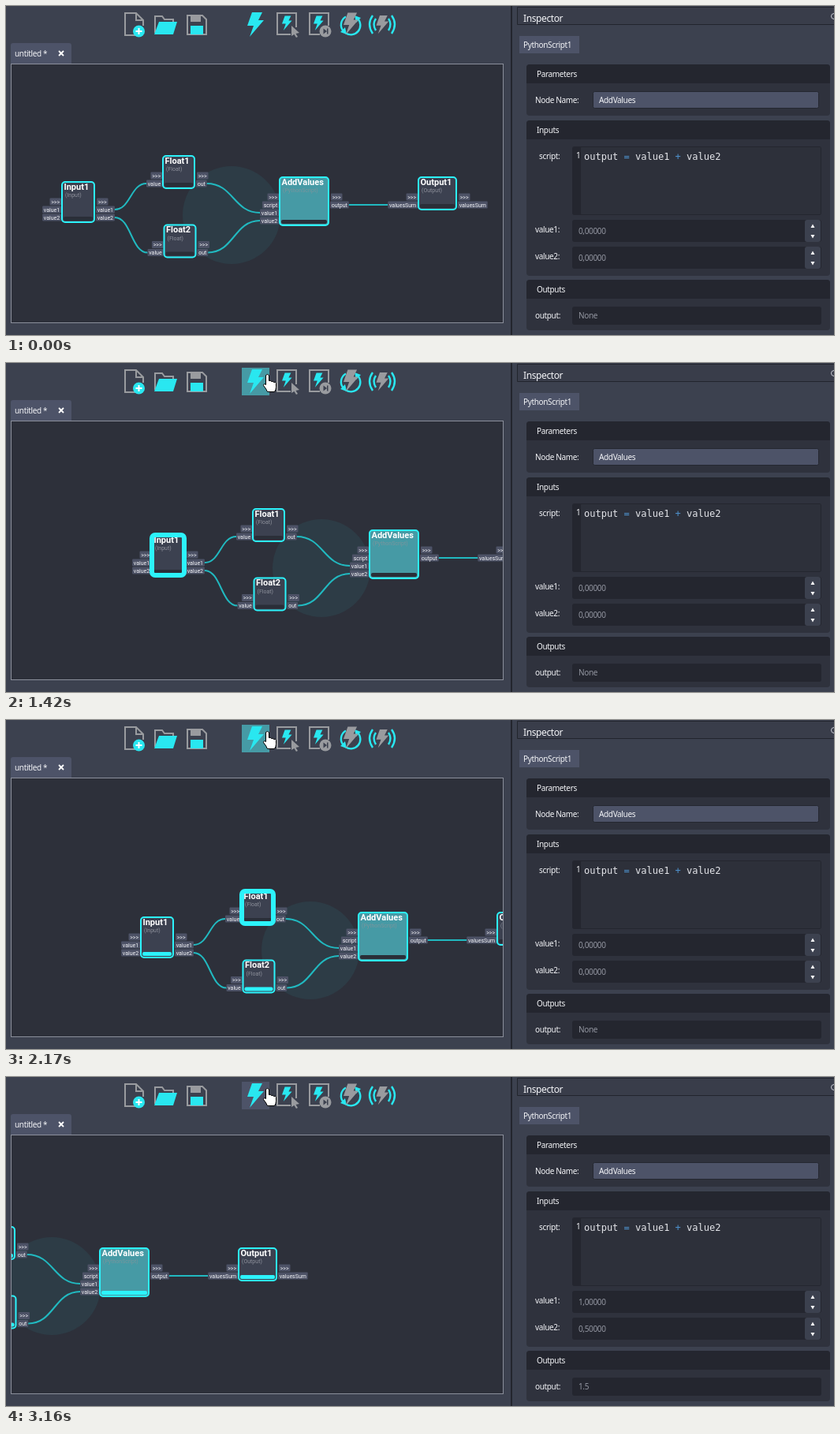
These frames come from a looping animation (1050x417 px, 3.86 s). An HTML page:

```html
<!DOCTYPE html>
<html lang="en">
<head>
<meta charset="utf-8">
<title>Node editor</title>
<style>
html, body { margin: 0; width: 100%; height: 100%; overflow: hidden; background: #3c414f; }
svg { display: block; }
text { font: 10px "Noto Sans", sans-serif; letter-spacing: -.35px; fill: #f4f5f8; white-space: pre; }
.head { font-size: 12px; letter-spacing: -.4px; }
.value { fill: #9396a1; }
.code { font: 12px "DejaVu Sans Mono", monospace; letter-spacing: 0; fill: #e4e5ea; }
.code tspan { fill: #4f93cf; }
.node text, .port { font: 7px Roboto, sans-serif; letter-spacing: 0; }
.node .title { font: 700 11px Roboto, sans-serif; fill: #fff; }
.node .type { fill: #8d909b; }
.body { fill: #3c4150; }
.selected .body { fill: #469aa5; }
.selected .type { fill: #7a959d; }
.bar { fill: #2a2e38; }
.done .bar { fill: #2cf3fb; }
.frame { fill: none; stroke: #2cf3fb; stroke-width: 2; }
.active .frame { stroke-width: 6; }
.link { fill: none; stroke: #21b9c0; stroke-width: 2; }
.cyan { fill: #29e7f0; }
.gray { fill: #999b9f; }
.line { fill: none; stroke: #999b9f; stroke-width: 2; }
.arc { fill: none; stroke: #29e7f0; stroke-width: 2.4; }
</style>
</head>
<body>
<svg id="stage" width="1050" height="417">
  <defs>
    <clipPath id="view"><rect x="7" y="74" width="623" height="327"/></clipPath>
    <path id="bolt" d="M-4-16H9L4-6H11L-7 15L-2 1H-10Z"/>
  </defs>
  <rect width="1050" height="417" fill="#3c414f"/>

  <g id="toolbar">
    <rect id="button" x="299" y="6" width="35" height="35"/>
    <path class="line" d="M164 37H151V9H165L174 18V25M165 9V18H174"/>
    <circle class="cyan" cx="168.500" cy="32" r="7.500"/>
    <path d="M168.500 28V36M164.500 32H172.500" stroke="#fff" stroke-width="2"/>
    <path class="line" d="M189 34V13H198L201 17H212V21"/>
    <path class="cyan" d="M194 20H217L212 36H188Z"/>
    <path class="line" d="M230 12H249L254 17V36H230Z"/>
    <path class="gray" d="M234 12H247V20H234Z"/>
    <path class="cyan" d="M234 25H250V36H234Z"/>
    <use href="#bolt" class="cyan" x="316" y="24"/>
    <path class="line" d="M361 36H344V9H368V27"/>
    <use href="#bolt" class="cyan" transform="translate(356 22) scale(.6)"/>
    <path class="gray" d="M362 25L372 34L367.500 35L370 39L368 40L365.500 36L362 38Z"/>
    <path class="line" d="M398 36H385V9H409V25"/>
    <use href="#bolt" class="cyan" transform="translate(396 22) scale(.6)"/>
    <circle class="gray" cx="405" cy="32" r="7.500"/>
    <path d="M402.500 28.500L407 32L402.500 35.500ZM407 28.500H408.500V35.500H407Z" fill="#3c414f"/>
    <path class="arc" d="M428 32A12 12 0 0 1 431 13.500M446 16A12 12 0 0 1 431 34.500"/>
    <path class="cyan" d="M442 12L450 15L444 21ZM432 36L424 33L430 27Z"/>
    <use href="#bolt" class="gray" transform="translate(437 23) scale(.9)"/>
    <use href="#bolt" class="gray" transform="translate(477 24) scale(.75)"/>
    <path class="arc" d="M469 16Q464 23 469 31M465 12Q457 23 465 35M485 16Q490 23 485 31M489 12Q497 23 489 35"/>
  </g>

  <path d="M6 73V50Q6 47 9 47H80Q83 47 83 50V73Z" fill="#4d5368"/>
  <text x="11" y="64">untitled *</text>
  <path d="M67 57L73 63M73 57L67 63" stroke="#fff" stroke-width="1.800"/>
  <rect x="6.500" y="73.500" width="624" height="328" fill="#2d303a" stroke="#8b8f9b"/>
  <g clip-path="url(#view)"><g id="graph"><circle cx="286" cy="265" r="62" fill="#2d3c46"/></g></g>

  <path d="M641 0V417" stroke="#23262e" stroke-width="2"/>
  <path d="M1050 1.500H648.500V23.500H1050" fill="#393d4a" stroke="#22252d"/>
  <text class="head" x="656" y="20">Inspector</text>
  <circle cx="1050" cy="13" r="3.500" fill="none" stroke="#c9ccd4"/>
  <rect x="651" y="38" width="76" height="22" fill="#4d5368"/>
  <text x="656" y="53">PythonScript1</text>
  <g id="panel"></g>
  <g id="cursor" stroke="#000" fill="#fff">
    <path id="arrow" d="M0 0V16L4 12.500L6.500 18L9 17L6.500 11.500H12Z"/>
    <path id="hand" d="M-1 1Q1-1 3 1V8Q5 7 6 9Q8 8 9 10Q11 9 12 11V16Q12 19 10 22H1Q0 19-4 14Q-4 11-1 13Z"/>
  </g>
</svg>
<script>
const $ = id => document.getElementById(id);
const add = (parent, markup) => parent.insertAdjacentHTML('beforeend', markup);
const box = (x, y, w, h, fill, r = 3, extra = '') =>
  `<rect x="${x}" y="${y}" width="${w}" height="${h}" rx="${r}" fill="${fill}" ${extra}/>`;
const label = (x, y, text, attrs = '') => `<text x="${x}" y="${y}" ${attrs}>${text}</text>`;

// Inspector panel
const group = (y, h, title) => box(660, y, 385, h, '#2f323d', 4) +
  `<path d="M660 ${y + 24}v-20q0-4 4-4h377q4 0 4 4v20z" fill="#24262f"/>` + label(673, y + 16, title);
const field = (y, h) => box(718, y, 316, h, '#24262f');
const spin = (y, name) => label(671, y + 16, name + ':') + field(y, 28) +
  box(1013, y, 20, 28, '#3c414f') +
  `<path d="M1020.500 ${y + 10}h5l-2.500-4.500zM1020.500 ${y + 19}h5l-2.500 4.500z" fill="#fff"/>` +
  label(726, y + 18, '', `class="value" id="${name}"`);

add($('panel'),
  group(74, 65, 'Parameters') + label(671, 123, 'Node Name:') +
  box(744.5, 108.5, 286, 21, '#4d5368', 2, 'stroke="#252831"') + label(752, 123, 'AddValues') +
  group(145, 197, 'Inputs') + label(676, 194, 'script:') + field(178, 87) +
  box(729, 179, 304, 85, '#2d303a', 1) + label(723, 193, '1') +
  label(733, 195, 'output <tspan>=</tspan> value1 <tspan>+</tspan> value2', 'class="code"') +
  spin(271, 'value1') + spin(305, 'value2') +
  group(347, 64, 'Outputs') + label(671, 396, 'output:') + field(381, 23) +
  label(726, 396, '', 'class="value" id="output"'));

// Node graph, listed in order of execution
const node = (name, type, x, y, w, h, ins, outs) => ({ name, type, x, y, w, h, ins, outs });
const nodes = [
  node('Input1', 'Input', 70, 222, 43, 53, ['value1', 'value2'], ['value1', 'value2']),
  node('Float2', 'Float', 199.5, 276.5, 42, 43, ['value'], ['out']),
  node('Float1', 'Float', 198, 189, 42, 43, ['value'], ['out']),
  node('AddValues', 'PythonScript', 346, 216, 64, 63, ['script', 'value1', 'value2'], ['output']),
  node('Output1', 'Output', 522, 216, 50, 43, ['valuesSum'], ['valuesSum'])
];
const pen = document.createElement('canvas').getContext('2d');
pen.font = '7px Roboto, sans-serif';
const portWidth = text => pen.measureText(text).width + 3.5;
const portY = (n, row) => n.y + 36 + row * 10;
const outX = n => n.x + n.w + 1;

function link(from, out, to, into) {
  const a = nodes[from], b = nodes[to];
  const x1 = outX(a) + portWidth(a.outs[out]), y1 = portY(a, out);
  const x2 = b.x - portWidth(b.ins[into]), y2 = portY(b, into), mid = (x1 + x2) / 2;
  return `<path class="link" d="M${x1} ${y1}C${mid} ${y1} ${mid} ${y2} ${x2} ${y2}"/>`;
}
const port = (x, y, text) => box(x, y - 4.5, portWidth(text), 9, '#4d5266', 1) +
  label(x + 1.7, y + 2.5, text.replaceAll('>', '&gt;'), 'class="port"');

function nodeMarkup(n) {
  const { name, type, x, y, w, h } = n;
  const ports = ['>>>', ...n.ins].map((p, i) => port(x - portWidth(p), portY(n, i - 1), p)).join('') +
    ['>>>', ...n.outs].map((p, i) => port(outX(n) + (i ? 0 : 1), portY(n, i - 1), p)).join('');
  const rect = (cls, dx, dy, rw, rh, r) =>
    `<rect class="${cls}" x="${x + dx}" y="${y + dy}" width="${rw}" height="${rh}" rx="${r}"/>`;
  return `<g class="node" id="${name}">${ports}` + rect('body', 1, 1, w - 2, h - 2, 4) +
    label(x + 3.5, y + 10.5, name, 'class="title"') + label(x + 5, y + 20, `(${type})`, 'class="type"') +
    rect('bar', 3, h - 8, w - 6, 5, 2) + rect('frame', 1, 1, w - 2, h - 2, 4) + '</g>';
}
add($('graph'), link(0, 0, 2, 0) + link(0, 1, 1, 0) + link(2, 0, 3, 1) + link(1, 0, 3, 2) +
  link(3, 0, 4, 0) + nodes.map(nodeMarkup).join(''));
$('AddValues').classList.add('selected');

// Timeline
const LOOP = 3860, MOVE = 70, HOVER = 550, PRESS = 880, FINISH = 3160;
const STARTS = [1420, 1560, 2030, 2500, 2700];
const GLIDE = [.5, .85, 1];
const mix = (a, b, p) => a + (b - a) * p;
const focus = n => n ? [318.5 - n.x - n.w / 2, 237.5 - n.y - n.h / 2] : [0, 0];

function draw(t) {
  const finished = t >= FINISH, hover = t >= HOVER;
  const current = STARTS.filter(s => t >= s).length - 1;
  const p = current < 0 ? 0 : GLIDE[Math.min(2, Math.floor((t - STARTS[current]) / 65))];
  const from = focus(nodes[current - 1]), to = focus(nodes[current]);
  const shift = from.map((v, i) => Math.round(mix(v, to[i], p)));
  $('graph').setAttribute('transform', `translate(${shift})`);
  nodes.forEach((n, i) => {
    const list = $(n.name).classList;
    list.toggle('active', i === current && !finished);
    list.toggle('done', i < current || finished);
  });

  const step = Math.max(0, Math.min(7, Math.floor((t - MOVE) / 68.5))) / 7;
  const ease = step * step * (3 - 2 * step);
  $('cursor').setAttribute('transform', `translate(${mix(940, 330.5, ease)} ${mix(402, 14.5, ease)})`);
  $('cursor').style.display = t < MOVE ? 'none' : '';
  $('arrow').style.display = hover ? 'none' : '';
  $('hand').style.display = hover ? '' : 'none';
  $('button').setAttribute('fill', !hover ? 'none' : t >= PRESS && !finished ? '#469aa5' : '#4d5368');

  $('value1').textContent = finished ? '1,00000' : '0,00000';
  $('value2').textContent = finished ? '0,50000' : '0,00000';
  $('output').textContent = finished ? '1.5' : 'None';
}

const start = performance.now();
function tick() {
  draw((performance.now() - start) % LOOP);
  requestAnimationFrame(tick);
}
tick();
</script>
</body>
</html>
```
